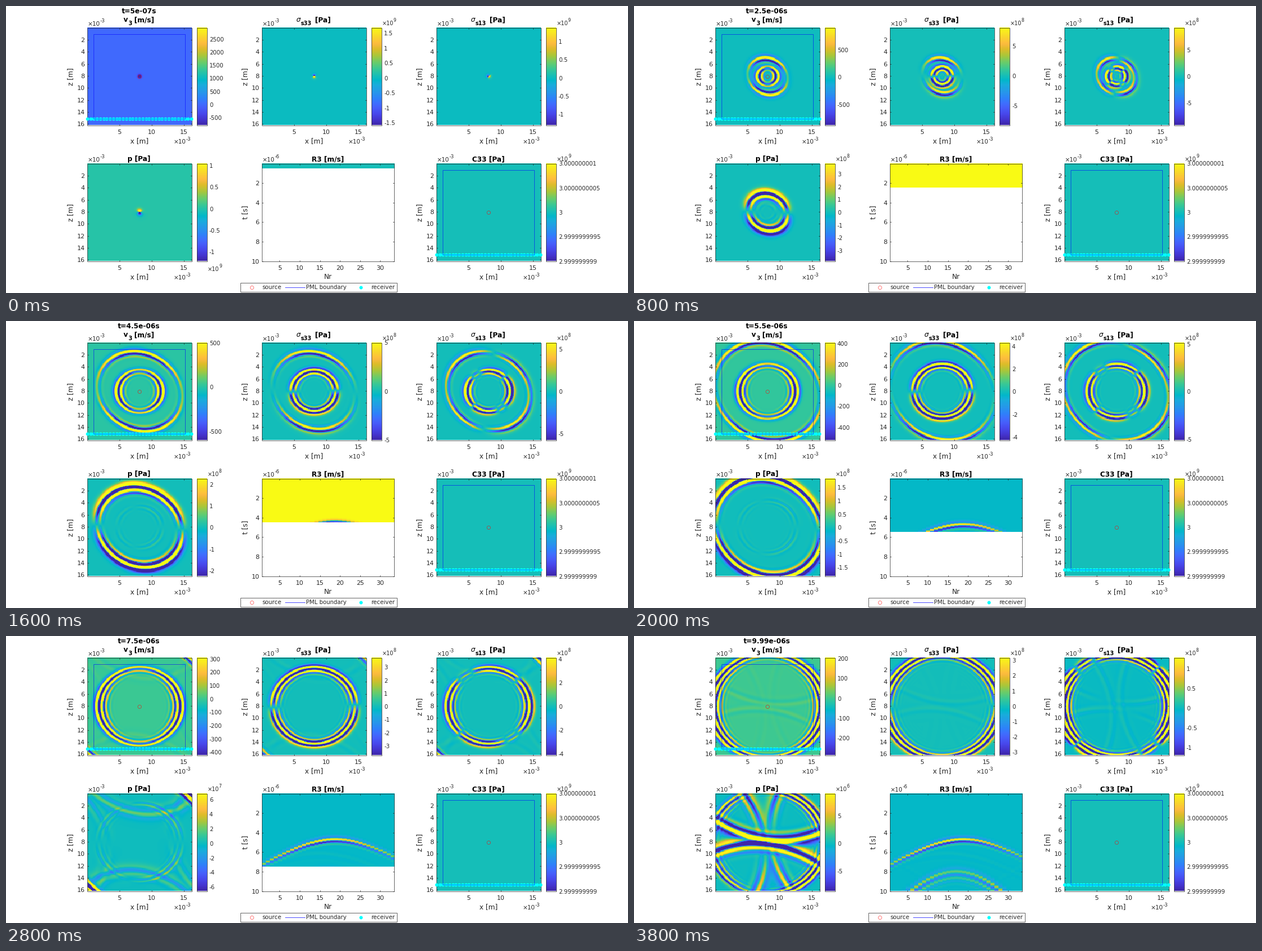
Recreate the animation shown at these times as a matplotlib script. Size 1101 by 509 pixels, loop 4 s.

```python
import numpy as np
import matplotlib.pyplot as plt
from matplotlib.animation import FuncAnimation
from matplotlib.colors import LinearSegmentedColormap
from matplotlib.patches import Rectangle

W, H, DPI = 1101, 509, 64
PT = 72 / DPI                      # points per pixel
FRAMES, STEP_MS = 20, 200
SX, SZ = 11.44, 10.68              # pixels per millimetre
SIDE, MID = 16.15, 8.08
INK = "#262626"

STOPS = [
    (0, .242, .150, .660), (3, .265, .198, .795), (7, .280, .278, .922),
    (11, .276, .367, .983), (14, .244, .436, .999), (17, .183, .507, .980),
    (21, .154, .590, .922), (26, .095, .680, .860), (29, .004, .720, .792),
    (32, .096, .750, .712), (36, .216, .784, .592), (40, .391, .803, .435),
    (45, .672, .779, .223), (49, .863, .741, .160), (52, .973, .730, .239),
    (53, .996, .743, .237), (57, .979, .839, .177), (63, .977, .984, .081),
]
PARULA = LinearSegmentedColormap.from_list(
    "parula", [(i / 63, rgb) for i, *rgb in STOPS], 256)

# Colour limits at a few key steps, blended geometrically in between
KEYS = [0, 2, 6, 10, 14, 16, 19]
LIMITS = {
    "v": ([2944, 1333, 615, 411, 311, 273, 206],
          [782, 1106, 687, 522, 421, 388, 286]),
    "s33": ([1.69e9, 1.125e9, 5.8e8, 4.33e8, 3.73e8, 3.5e8, 3.19e8],
            [1.58e9, 1.13e9, 5.9e8, 4.25e8, 3.69e8, 3.5e8, 3.19e8]),
    "s13": ([1.38e9, 1.32e9, 6.53e8, 5.15e8, 4.14e8, 3.5e8, 1.29e8],
            [1.29e9, 1.31e9, 6.5e8, 5.09e8, 4.1e8, 3.47e8, 1.19e8]),
    "p": ([1.05e9, 5.27e8, 2.8e8, 1.84e8, 6.85e7, 4.78e6, 9.1e6],
          [1.21e9, 5.24e8, 2.77e8, 1.81e8, 6.54e7, 4.89e6, 8.55e6]),
}
LOW_EXPONENT = {"s33": {2}, "p": {0, 1, 16, 17}}


def limits(name, k):
    hi, lo = (np.exp(np.interp(k, KEYS, np.log(v))) for v in LIMITS[name])
    return -lo, hi


def envelope(s, centre, lead, tail):
    d = s - centre
    return np.exp(-(d / np.where(d < 0, lead, tail)) ** 2)


def fast_wave(x, z, t, stretch=1):
    """Elliptic outer front: v, s33, s13, p."""
    r = np.hypot(x, z) + 1e-6
    s = t - .72 - np.sqrt(.33 * x * x - .084 * x * z + .327 * z * z)
    s = s / stretch
    c, d = x / r, (z - .05 * x) / r
    fall = 1 / np.sqrt(r + .3)
    osc = np.cos(2 * np.pi * np.maximum(s, -.28) / .56)
    w = osc * envelope(s, .12, .33, .3) * fall
    osc_p = np.cos(2 * np.pi * np.maximum(s, -.3) / .6)
    wp = osc_p * envelope(s, 0, .38, .45) * fall
    return np.array([
        2880 * (.15 + .85 * d * d) * w,
        -2.1e9 * d * (.35 + .65 * d * d) * w,
        -3.6e9 * (c + .12 * d) * (.25 + d * d) * w,
        2.4e9 * d * wp,
    ])


def slow_wave(x, z, t):
    """Round inner front with a dispersive tail."""
    r = np.hypot(x, z) + 1e-6
    s = t - .82 - np.sqrt(x * x + 1.05 * z * z)
    c, d = x / r, (z + .03 * x) / r
    a = np.arctan2(z, x)
    period = .74 + .14 * c * c
    sc = np.maximum(s, -period / 2)
    phase = sc / period + .12 * np.maximum(sc, 0) ** 2
    tail = .5 + (.03 + .05 * c * c) * t
    w = np.cos(2 * np.pi * phase) * envelope(s, .12, .48, tail)
    w = w / np.sqrt(r + .3)
    shear = np.cos(a + .44) * np.cos(2 * a)
    return np.array([
        2900 * (.28 + .72 * c * c) * w,
        -3.3e9 * d / (.3 + np.abs(d)) * w,
        -3.2e9 * shear / (.25 + np.abs(shear)) * w,
        5e7 * (np.sin(2 * a) + .5 * d) * w,
    ])


def wavefield(x, z, t):
    # weak, smoothed copies wrap around from the four neighbouring cells
    total = fast_wave(x, z, t) + slow_wave(x, z, t)
    for dx, dz in ((-1, 0), (1, 0), (0, -1), (0, 1)):
        total += .03 * fast_wave(x - dx * SIDE, z - dz * SIDE, t - .22, 1.45)
    return total


axis_mm = (np.arange(162) + .5) / 162 * SIDE - MID
GX, GZ = np.meshgrid(axis_mm, axis_mm)

# Receiver record
ROWS, NREC = 400, 33
rec_t = (np.arange(ROWS) + .5) / ROWS * 10
rec_x = np.linspace(-8.05, 8.05, NREC)
RX, RT = np.meshgrid(rec_x, rec_t)
RECORD = wavefield(RX, np.full_like(RX, 7.0), RT)[0]

fig = plt.figure(figsize=(W / DPI, H / DPI), dpi=DPI, facecolor="white")
ax = fig.add_axes([0, 0, 1, 1])
ax.axis("off")


def text(x, y, s, size=11, ha="left", color=INK, **kw):
    return ax.text(x, y + .365 * size, s, fontsize=size * PT, ha=ha,
                   va="baseline", color=color, **kw)


def power(x, y, e, size=10.4):
    return [text(x, y, "×10", size),
            text(x + 2.11 * size, y - 5, str(e), size * .82)]


def line(xs, ys, color=INK, width=.7, z=4):
    ax.plot(xs, ys, color=color, lw=width * PT, zorder=z)


def frame(x0, y0, x1, y1, color=INK, z=5, width=.7):
    ax.add_patch(Rectangle((x0, y0), x1 - x0, y1 - y0, fill=False,
                           ec=color, lw=width * PT, zorder=z))


def image(data, x0, y0, x1, y1):
    return ax.imshow(data, extent=(x0, x1, y1, y0), cmap=PARULA, vmin=0,
                     vmax=1, aspect="auto", interpolation="nearest", zorder=1)


def ticks(x0, y0, x1, y1, xt, yt):
    for px, lab in xt:
        line([px, px], [y1, y1 - 2])
        line([px, px], [y0, y0 + 2])
        text(px, y1 + 11.5, lab, ha="center")
    for py, lab in yt:
        line([x0, x0 + 2], [py, py])
        line([x1, x1 - 2], [py, py])
        text(x0 - 4, py, lab, ha="right")


def axis_names(x0, y0, x1, y1, xname, yname):
    text((x0 + x1) / 2, y1 + 27, xname, 12.1, "center")
    ax.text(x0 - 29, (y0 + y1) / 2, yname, fontsize=12.1 * PT, rotation=90,
            ha="center", va="center", color=INK)


def map_panel(x0, y0, y1):
    x1 = x0 + 185
    im = image(np.full((162, 162), .5), x0, y0, x1, y1)
    frame(x0, y0, x1, y1)
    ticks(x0, y0, x1, y1, [(x0 + SX * v, str(v)) for v in (5, 10, 15)],
          [(y0 + SZ * v, str(v)) for v in range(2, 17, 2)])
    axis_names(x0, y0, x1, y1, "x [m]", "z [m]")
    power(x0 + 1, y0 - 7.5, -3)
    power(x0 + 153, y1 + 29, -3)
    bar = (x0 + 194.5, y0, x0 + 212, y1)
    image(np.linspace(1, 0, 256)[:, None], *bar)
    frame(*bar)
    return im, bar


def ring(x, y):
    ax.plot(x, y, "o", ms=6.2 * PT, mfc="none", mec="red",
            mew=.5 * PT, zorder=7)


def geometry(x0, y0):
    yr = y0 + 161.5
    ax.plot(x0 + 92.5 + rec_x * SX, np.full(NREC, yr), "o", ms=6 * PT,
            color="cyan", mew=0, zorder=6)
    frame(x0 + 11.5, y0 + 11, x0 + 173, yr, "blue", 7, .55)
    ring(x0 + 92.5, y0 + 86.5)


def title(x, y, s, **kw):
    return text(x, y, s, 12.1, kw.pop("ha", "center"), "black",
                fontweight="bold", **kw)


def stress_title(x, sub):
    text(x, 23.5, "σ", 12.1, color="black", fontstyle="italic")
    text(x + 7.5, 30, sub, 9.9, color="black", fontweight="bold")
    title(x + 33, 24, "[Pa]", ha="left")


TOP, BOTTOM = (38.5, 211.5), (279.5, 452.5)
PANELS = {
    "v": map_panel(143.5, *TOP),
    "s33": map_panel(452.5, *TOP),
    "s13": map_panel(761.5, *TOP),
    "p": map_panel(143.5, *BOTTOM),
}
_, c_bar = map_panel(761.5, *BOTTOM)
for j, lab in enumerate(("3.000000001", "3.0000000005", "3",
                         "2.9999999995", "2.999999999")):
    text(c_bar[2] + 5, c_bar[1] + j * 43.4, lab, 10.1)
power(c_bar[2] + 1.5, 271.5, 9, 9.6)
geometry(143.5, TOP[0])
geometry(761.5, BOTTOM[0])

clock = title(235.5, 9, "")
title(208, 24, "v", ha="left")
text(216, 30, "3", 9.9, color="black", fontweight="bold")
title(227.5, 24, "[m/s]", ha="left")
stress_title(514, "s33")
stress_title(823, "s13")
title(235.5, 271, "p [Pa]")
title(569.5, 271, "R3 [m/s]")
title(853.5, 271, "C33 [Pa]")

# Receiver panel
R_BOX = (452.5, BOTTOM[0], 687, BOTTOM[1])
record = image(np.full((ROWS, NREC), np.nan), *R_BOX)
frame(*R_BOX)
ticks(*R_BOX, [(452.5 + (n - .5) * 234.5 / NREC, str(n))
               for n in range(5, 31, 5)],
      [(BOTTOM[0] + 17.3 * v, str(v)) for v in range(2, 11, 2)])
axis_names(*R_BOX, "Nr", "t [s]")
power(453.5, 272, -6)

# Legend
frame(414.5, 490.5, 692, 506.5)
ring(434.5, 498.5)
line([494, 529], [498.5, 498.5], "blue", .7)
ax.plot(627.5, 498.5, "o", ms=6 * PT, color="cyan", mew=0)
text(453, 498.5, "source", 10.3)
text(531, 498.5, "PML boundary", 10.1)
text(646.5, 498.5, "receiver", 10.3)

ax.set_xlim(0, W)
ax.set_ylim(H, 0)
bar_texts = []


def tick_step(span):
    unit = 10 ** np.floor(np.log10(span))
    lead = span / unit
    for top, step in ((1.2, .5), (1.6, .2), (4.5, .5), (8, 1)):
        if lead < top:
            return step * unit
    return 2 * unit


def label_bar(name, k, lo, hi):
    x0, y0, x1, y1 = PANELS[name][1]
    e = 0 if name == "v" else int(np.floor(np.log10(max(hi, -lo))))
    lo, hi = lo / 10 ** e, hi / 10 ** e
    step = tick_step(hi - lo)
    for n in range(int(np.ceil(lo / step)), int(np.floor(hi / step)) + 1):
        y = y1 - (n * step - lo) / (hi - lo) * (y1 - y0)
        bar_texts.append(text(x1 + 4.5, y, f"{n * step:g}", 10.1))
    if e:
        low = k in LOW_EXPONENT.get(name, ())
        spot = (x1 + 1.5, y1 + 13.5) if low else (x1 + 1, y0 - 8)
        bar_texts.extend(power(*spot, e, 9.6))


def show_record(k, t):
    data = RECORD.copy()
    past = rec_t < t
    if k < 5:
        data[:] = .5 if k == 0 else 1
    else:
        lo, hi = data[past].min(), data[past].max()
        data = (data - lo) / (hi - lo)
    data[~past] = np.nan
    record.set_data(np.ma.masked_invalid(data))


def update(k):
    while bar_texts:
        bar_texts.pop().remove()
    t = min(.5 * (k + 1), 9.99)
    clock.set_text(f"t={t * 1e-6:.3g}s")
    for name, field in zip(PANELS, wavefield(GX, GZ, t)):
        lo, hi = limits(name, k)
        PANELS[name][0].set_data((field - lo) / (hi - lo))
        label_bar(name, k, lo, hi)
    show_record(k, t)
    return []


anim = FuncAnimation(fig, update, frames=FRAMES, interval=STEP_MS,
                     repeat=True, repeat_delay=0, blit=False)
plt.show()
```
